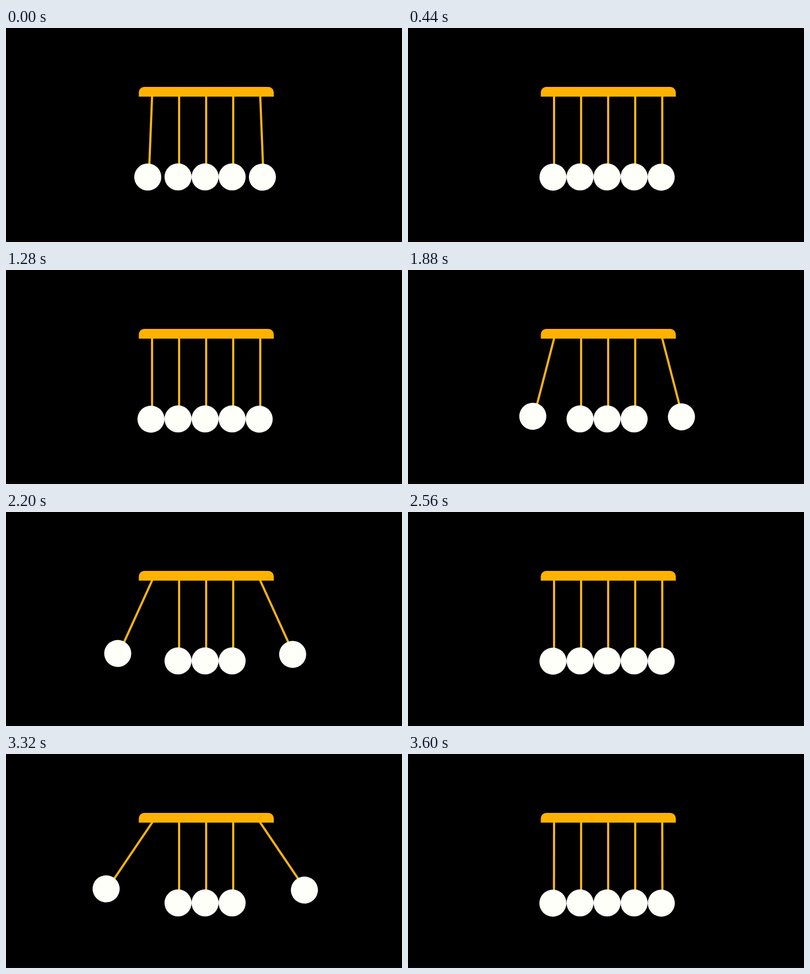
Animation of 732 by 396 pixels, one loop 3640 ms. Source, as an HTML page:

```html
<!DOCTYPE html>
<html lang="en">
<head>
<meta charset="utf-8">
<title>Cradle</title>
<style>
  html, body { margin: 0; width: 100%; height: 100%; overflow: hidden; background: #000; }
  svg { display: block; width: 732px; height: 396px; }
  .string { stroke: #f8b414; stroke-width: 4; }
  .ball { fill: #fffffa; }
  .bar { fill: #ffb300; }
</style>
</head>
<body>
<svg id="stage" viewBox="0 0 732 396">
  <rect width="732" height="396"/>
  <rect y="392" width="732" height="4" fill="#070204"/>
</svg>
<script>
const LOOP = 3640, STEP = 40;
const TOP = 127, GAP = 50, FIRST_X = 270;
const SWING = 50, WIDTH = 166;
const PEAKS = [-301, 856, 2064.5, 3224.5]; // moments of widest swing, ms

const stage = document.getElementById('stage');

function add(tag, attrs, parent = stage) {
  const el = document.createElementNS('http://www.w3.org/2000/svg', tag);
  for (const key in attrs) el.setAttribute(key, attrs[key]);
  return parent.appendChild(el);
}

const arms = Array.from({ length: 5 }, (_, i) => {
  const x = FIRST_X + i * GAP;
  const outer = i === 0 || i === 4;
  const arm = add('g', {});
  add('line', { class: 'string', x1: x, x2: x, y1: TOP - 3, y2: 256 }, arm);
  add('circle', { class: 'ball', cx: x - 2, cy: outer ? 276 : 275.6, r: 25 }, arm);
  return arm;
});
add('path', { class: 'bar', d: 'M245.5 127V119a10 10 0 0 1 10-10H485a10 10 0 0 1 10 10V127Z' });

// A rounded peak that falls off to a full rest
function lobe(s) {
  const k = Math.exp(-Math.pow(Math.abs(s) / WIDTH, 1.75));
  return Math.max(0, (SWING + 0.7) * k - 0.7);
}

function draw(t) {
  const angle = PEAKS.reduce((sum, peak) => sum + lobe(t - peak), 0);
  const turn = (i, a) =>
    arms[i].setAttribute('transform', `rotate(${a.toFixed(3)} ${FIRST_X + i * GAP} ${TOP})`);
  turn(0, angle);
  turn(4, -angle);
}

const start = performance.now();
function tick() {
  const t = (performance.now() - start) % LOOP;
  draw(Math.floor(t / STEP) * STEP);
  requestAnimationFrame(tick);
}
draw(0);
requestAnimationFrame(tick);
</script>
</body>
</html>
```
